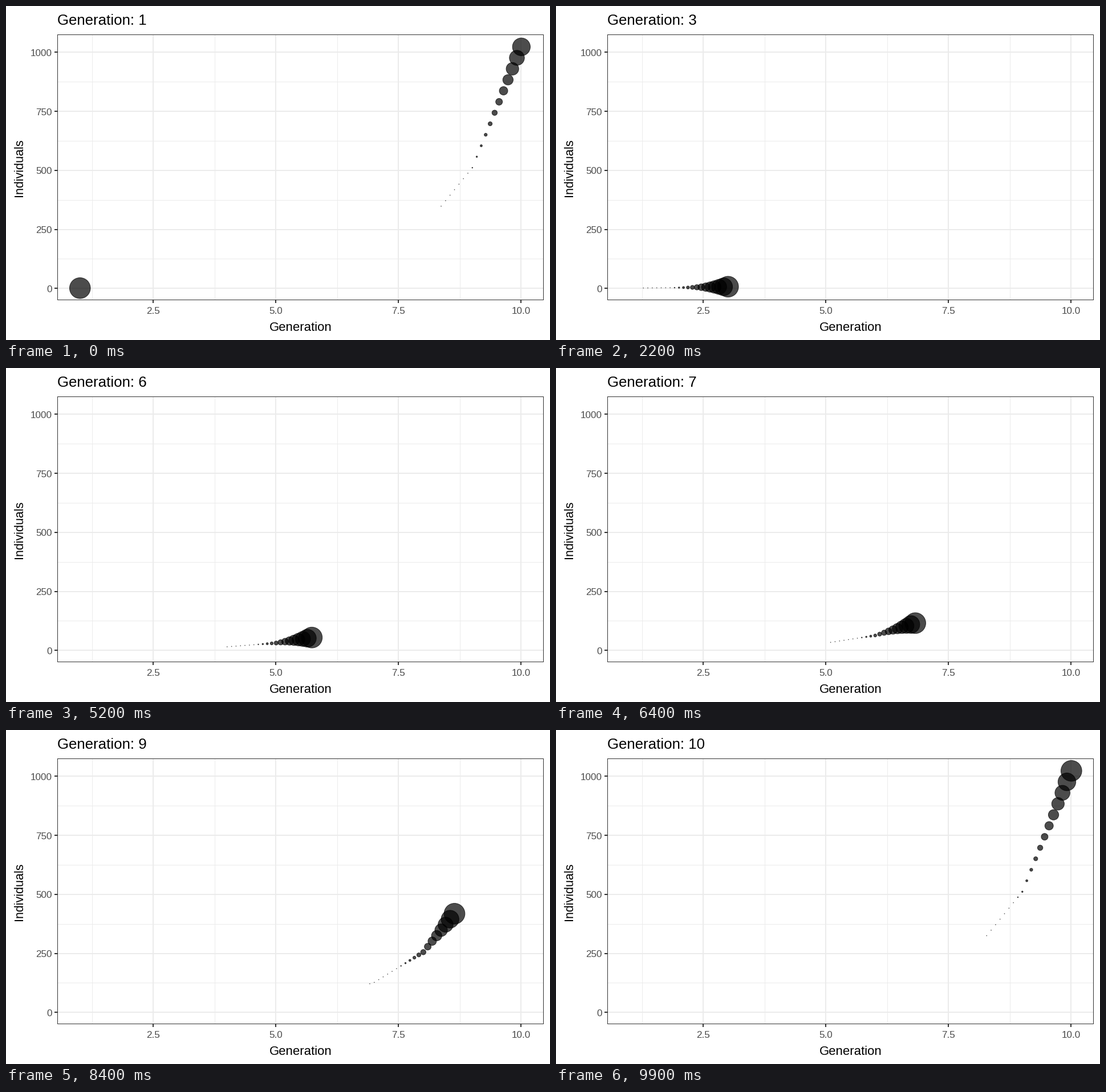
Recreate the animation shown at these times as a matplotlib script. Size 954 by 587 pixels, loop 10 s.

```python
import numpy as np
import matplotlib.pyplot as plt
from matplotlib.animation import FuncAnimation
from matplotlib.patches import Rectangle

W, H, DPI = 954, 587, 64
PT = 72 / DPI                       # points per pixel
FRAMES, WAKE = 100, 20
LEFT, RIGHT, TOP, BOTTOM = 90.75, 942.2, 50.3, 516.7
GENS = np.arange(1, 11)
COUNTS = 2.0 ** GENS
GRID, DARK, GREY = "#ebebeb", "#333333", "#4d4d4d"

plt.rcParams["font.family"] = "Liberation Sans"
fig = plt.figure(figsize=(W / DPI, H / DPI), dpi=DPI, facecolor="white")
ax = fig.add_axes([0, 0, 1, 1])
ax.set_xlim(0, W)
ax.set_ylim(H, 0)
ax.axis("off")


def px(gen):
    return LEFT + (gen - 0.55) / 9.9 * (RIGHT - LEFT)


def py(count):
    return BOTTOM - (count + 49.1) / 1124.2 * (BOTTOM - TOP)


def box(x0, y0, x1, y1, color, z):
    ax.add_patch(Rectangle((x0, y0), x1 - x0, y1 - y0, fc=color, lw=0, zorder=z))


def label(x, y, s, size, color="black", **kw):
    return ax.text(x, y, s, fontsize=size * PT, color=color, va="baseline", zorder=6, **kw)


def span(pos, width):
    """Whole-pixel extent of a line of the given width."""
    start = round(pos) - width // 2
    return start, start + width


def vline(x, width, y0=TOP, y1=BOTTOM, color=GRID, z=1):
    a, b = span(x, width)
    box(a, y0, b, y1, color, z)


def hline(y, width, x0=LEFT, x1=RIGHT, color=GRID, z=1):
    a, b = span(y, width)
    box(x0, a, x1, b, color, z)


# Grid, ticks and tick labels
for g in (1.25, 3.75, 6.25, 8.75):
    vline(px(g), 1)
for c in (125, 375, 625, 875):
    hline(py(c), 1)
for g in (2.5, 5.0, 7.5, 10.0):
    vline(px(g), 2, z=2)
    vline(px(g), 2, BOTTOM, 522, DARK, 4)
    label(px(g), 541, f"{g:.1f}", 17.07, GREY, ha="center")
for c in (0, 250, 500, 750, 1000):
    hline(py(c), 2, z=2)
    hline(py(c), 2, 85, LEFT, DARK, 4)
    label(80.6, py(c) + 6.5, str(c), 17.07, GREY, ha="right")

# Panel border
box(90, 50, 91, 517, DARK, 5)
box(90, 50, 943, 51, DARK, 5)
box(941.5, 50, 943, 517, DARK, 5)
box(90, 515.5, 943, 517, DARK, 5)

label((LEFT + RIGHT) / 2, 571, "Generation", 22.1, ha="center")
label(28.6, (TOP + BOTTOM) / 2 + 0.3, "Individuals", 21.5, rotation=90,
      rotation_mode="anchor", ha="center")
title = label(90.5, 33, "", 25.9)

# The wake shrinks as a cubic of its age, down to a one-pixel dot
age = np.arange(WAKE)
radius = np.maximum(18.8 * (1 - age / WAKE) ** 3, 0.8) - 0.5
dots = ax.scatter(np.zeros(WAKE), np.zeros(WAKE), s=(2 * radius * PT) ** 2,
                  facecolors=[(0, 0, 0, 0.7)], edgecolors=[(0, 0, 0, 0.7)],
                  linewidths=PT, zorder=3)


def update(i):
    gen = 1 + 9 * ((i - age) % FRAMES) / (FRAMES - 1)
    x, y = px(gen), py(np.interp(gen, GENS, COUNTS))
    dots.set_offsets(np.column_stack([x, y]) + 0.3)
    title.set_text(f"Generation: {round(gen[0])}")
    return dots, title


anim = FuncAnimation(fig, update, frames=FRAMES, interval=100, repeat=True, repeat_delay=0)
plt.show()
```
